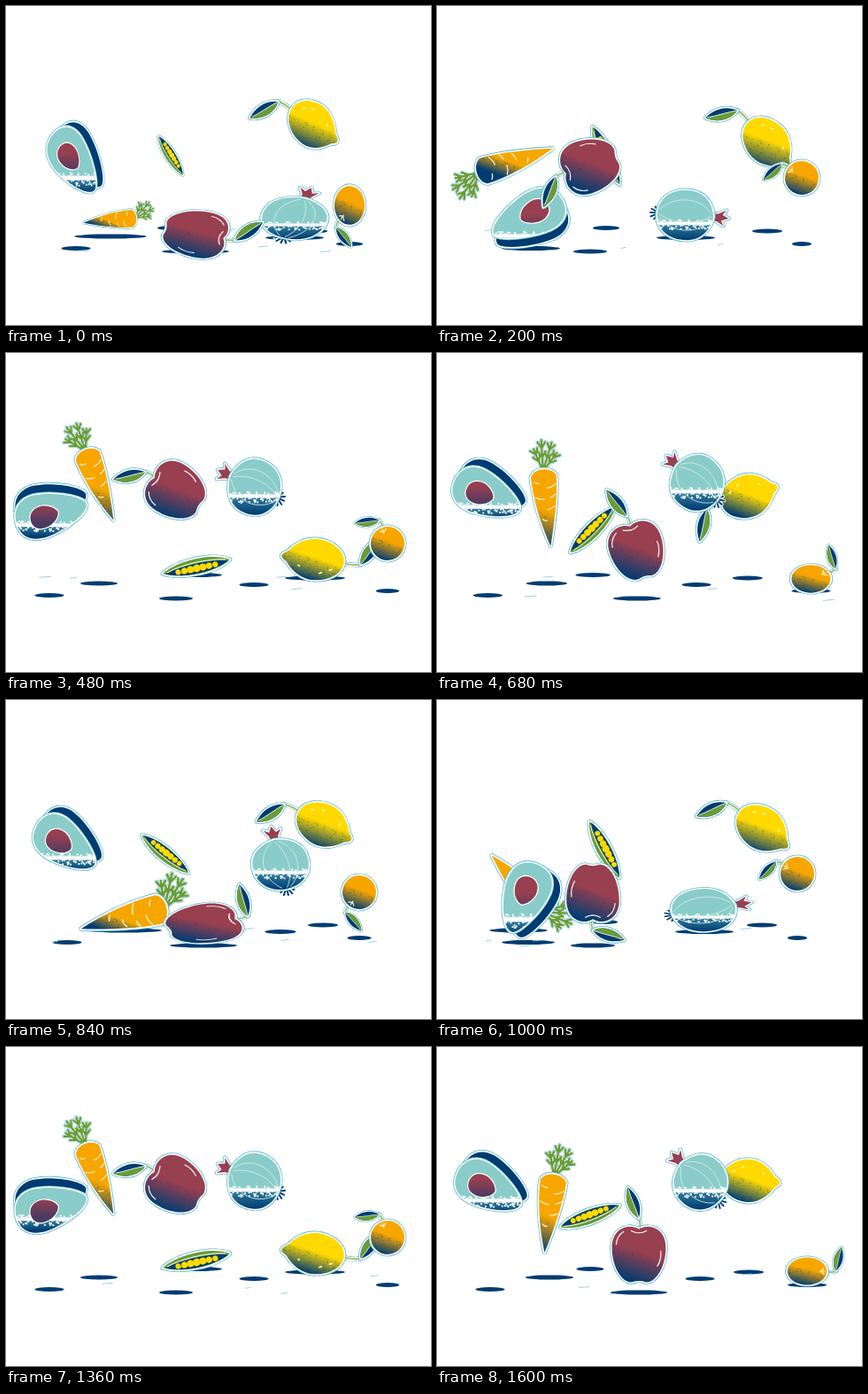
An HTML page with a canvas for the animation above (1640 ms loop, 480 by 360 pixels).

```html
<!DOCTYPE html>
<html lang="en">
<head>
<meta charset="utf-8">
<title>Bouncing fruit</title>
<style>
  html, body { margin: 0; width: 100%; height: 100%; overflow: hidden; background: #fff; }
  canvas { display: block; }
</style>
</head>
<body>
<canvas id="stage" width="480" height="360"></canvas>
<script>
const ctx = document.getElementById('stage').getContext('2d');
const LOOP = 1640, CYCLE = 880, STEP = 40, START = 400, SIZE = 0.95, TILT = 0.35;
const NAVY = '#003c71', CYAN = '#52b5d0', TEAL = '#8accc9', GREEN = '#6b9b37',
      YELLOW = '#ffd900', ORANGE = '#f7a600', MAROON = '#983f50', WHITE = '#fff';

// Key poses of one bounce cycle; every piece makes one full turn per cycle.
const TIMES = [0, 240, 360, 400, 520, 600];

const noise = n => { const s = Math.sin(n * 127.1 + 3.7) * 43758.5453; return s - Math.floor(s); };
const clamp = v => Math.max(0, Math.min(1, v));
const radians = degrees => degrees * Math.PI / 180;

// Cubic interpolation through cyclic keys; arcs may overshoot, other channels may not.
function sample(values, phase, turn = 0, overshoot = false) {
  const n = TIMES.length;
  const time = i => TIMES[(i + n) % n] + CYCLE * Math.floor(i / n);
  const value = i => values[(i + n) % n] + turn * Math.floor(i / n);
  const slope = i => (value(i + 1) - value(i)) / (time(i + 1) - time(i));
  const tangent = i => {
    const a = slope(i - 1), b = slope(i);
    if (!overshoot && a * b <= 0) return 0;
    const before = time(i) - time(i - 1), after = time(i + 1) - time(i);
    return (a * after + b * before) / (before + after);
  };
  let i = n - 1;
  while (TIMES[i] > phase) i--;
  const h = time(i + 1) - time(i), u = (phase - time(i)) / h, v = 1 - u;
  return value(i) * v * v * (1 + 2 * u) + value(i + 1) * u * u * (3 - 2 * u)
    + h * u * v * (tangent(i) * v - tangent(i + 1) * u);
}

function outlined(path, fill) {
  ctx.lineJoin = 'round';
  ctx.setLineDash([3, 1]);
  ctx.strokeStyle = CYAN;
  ctx.lineWidth = 5;
  ctx.stroke(path);
  ctx.setLineDash([]);
  line(path, WHITE, 3.4);
  ctx.fillStyle = fill;
  ctx.fill(path);
}

function line(path, color, width) {
  ctx.lineCap = 'round';
  ctx.strokeStyle = color;
  ctx.lineWidth = width;
  ctx.stroke(typeof path === 'string' ? new Path2D(path) : path);
}

// Shading along a fixed stage direction, whatever the turn of the piece.
function shade(angle, h, stops) {
  const dx = Math.sin(angle) * h, dy = Math.cos(angle) * h;
  const g = ctx.createLinearGradient(-dx, -dy, dx, dy);
  stops.forEach(([at, color]) => g.addColorStop(at, color));
  return g;
}

function grain(path, angle, h, color, from, to, count, size) {
  ctx.save();
  ctx.clip(path);
  ctx.rotate(-angle);
  ctx.fillStyle = color;
  for (let i = 0; i < count; i++) {
    const at = from + (to - from) * noise(i + 500);
    ctx.fillRect((noise(i) - 0.5) * 100, (at * 2 - 1) * h, size, size);
  }
  ctx.restore();
}

function body(path, pose, color, from = 0.45) {
  const angle = pose.angle - TILT;
  outlined(path, shade(angle, pose.h, [[from, color], [1, NAVY]]));
  grain(path, angle, pose.h, 'rgba(0,60,113,.5)', from + 0.05, 1, 140, 1);
}

function tealBody(path, pose, at) {
  outlined(path, shade(pose.angle, pose.h, [[at, TEAL], [at + 0.03, WHITE], [at + 0.07, WHITE],
    [at + 0.09, '#2c7899'], [1, NAVY]]));
  grain(path, pose.angle, pose.h, WHITE, at - 0.04, at + 0.15, 130, 2);
}

// The leaf keeps its own size while the body is squashed.
function stemAndLeaf(base, top, length, pose) {
  const stem = `M0 ${-base} Q3 ${-(base + top) / 2} 0 ${-top}`;
  line(stem, CYAN, 5.5);
  line(stem, WHITE, 4.5);
  line(stem, '#a8b860', 2);
  ctx.save();
  ctx.translate(0, -top);
  ctx.rotate(-pose.angle);
  ctx.scale(1 / pose.kx, 1 / pose.ky);
  ctx.rotate(pose.angle + radians(pose.bend));
  ctx.scale(length / 40, length / 40);
  outlined(new Path2D('M0 0C-10-11-9-27 0-39C8-27 9-12 0 0'), NAVY);
  ctx.fillStyle = GREEN;
  ctx.fill(new Path2D('M0 0C-10-11-9-27 0-39C-1-26 1-12 0 0'));
  line('M0 0C1-12-1-26 0-36', WHITE, 0.8);
  ctx.restore();
}

const egg = 'M-42 5C-42-13-30-23-13-22C10-20 42-4 44 5C45 17 12 29-12 30C-30 30-42 22-42 5Z';

function drawAvocado(pose) {
  const rind = new Path2D();
  rind.addPath(new Path2D(egg), new DOMMatrix().translate(3, -11));
  outlined(rind, NAVY);
  tealBody(new Path2D(egg), pose, 0.74);
  const seed = new Path2D('M-25 7C-25-3-17-8-7-7C3-5 9 2 9 6C6 15-4 19-12 19C-20 19-25 14-25 7Z');
  line(seed, WHITE, 2.5);
  ctx.fillStyle = shade(pose.angle, 16, [[0.3, MAROON], [1, '#4a3a62']]);
  ctx.fill(seed);
}

function drawCarrot(pose) {
  const sprigs = new Path2D();
  for (const a of [-0.5, -0.15, 0.2, 0.55]) {
    const len = 40 - Math.abs(a) * 24, tilt = a + radians(pose.bend);
    const c = Math.cos(tilt), s = Math.sin(tilt);
    sprigs.moveTo(-42, 0);
    sprigs.lineTo(-42 - c * len, -s * len);
    for (const k of [0.45, 0.75]) for (const side of [-0.6, 0.6]) {
      sprigs.moveTo(-42 - c * len * k, -s * len * k);
      sprigs.lineTo(-42 - c * len * k - Math.cos(tilt + side) * 8, -s * len * k - Math.sin(tilt + side) * 8);
    }
  }
  line(sprigs, CYAN, 4.2);
  line(sprigs, WHITE, 3.4);
  line(sprigs, GREEN, 2.4);
  const root = new Path2D('M-36-15C-10-14 20-7 46 0C20 9-10 15-36 15C-47 11-47-10-36-15Z');
  body(root, pose, ORANGE, 0.55);
  line('M-26-13Q-22-8-22-3M-12 12Q-9 7-9 2M0-9Q3-5 3-1M-30 12Q-28 9-28 6M14 6Q16 4 16 1M-14-12Q-11-9-11-6', '#fff1c8', 1.3);
}

function drawPea() {
  outlined(new Path2D('M-38 0C-22-11 18-11 38 0C20 11-20 12-38 0Z'), GREEN);
  ctx.fillStyle = NAVY;
  ctx.fill(new Path2D('M-36-1C-18-10 18-10 36-1C18 4-18 5-36-1Z'));
  line('M-33 1C-16 6 16 6 33 0', WHITE, 0.9);
  ctx.fillStyle = YELLOW;
  for (let i = -3; i <= 3; i++) {
    ctx.beginPath();
    ctx.arc(i * 7, -2, 4.3 - Math.abs(i) * 0.4, 0, 7);
    ctx.fill();
  }
}

function drawApple(pose) {
  stemAndLeaf(26, 43, 40, pose);
  body(new Path2D('M0-30C11-37 32-32 32-8C32 15 20 34 8 33Q0 30-8 33C-20 34-32 15-32-8C-32-32-11-37 0-30Z'), pose, MAROON);
  line('M-9-28Q0-23 9-28M-27-12Q-26-22-18-27M26-4Q27 6 22 14', WHITE, 1.2);
}

function drawOnion(pose) {
  const roots = 'M0 30L-5 39M0 30L0 40M0 30L5 39M0 30L-8 35M0 30L8 35';
  line(roots, WHITE, 4);
  line(roots, NAVY, 2);
  outlined(new Path2D('M-4-28L-5-36L-10-45L-4-41L0-48L4-40L10-43L5-35L4-28Z'), MAROON);
  tealBody(new Path2D('M0-31C10-30 32-24 32 0C32 20 18 32 0 32C-18 32-32 20-32 0C-32-24-10-30 0-31Z'), pose, 0.62);
  line('M-4-28C-25-15-24 15-5 30M4-28C25-15 24 15 5 30M0-28C12-10 12 15 1 30', '#d4eeec', 0.8);
}

function drawLemon(pose) {
  stemAndLeaf(30, 52, 40, pose);
  body(new Path2D('M0-33C15-33 25-16 25 0C25 16 13 27 6 32Q3 38 0 38Q-3 38-6 32C-13 27-25 16-25 0C-25-16-15-33 0-33Z'), pose, YELLOW);
  line('M10-20L11-18M15-9L16-7M9 18L10 17', '#fff3a0', 2);
}

function drawOrange(pose) {
  stemAndLeaf(17, 29, 30, pose);
  const ball = new Path2D();
  ball.arc(0, 0, 20, 0, 7);
  body(ball, pose, ORANGE, 0.42);
  line('M-4-17L0-14L4-17M0-18L0-13', '#fff1c8', 1.3);
}

// a, b: half size across and along; wide: shadow half width.
// p: how strongly a squash keeps the volume, -1 scales evenly.
const pieces = [
  { draw: drawPea, a: 37, b: 9, ground: 250.5, wide: 29, p: -1,
    x: [215, 173, 180, 186, 189, 191], y: [241, 191, 174, 169, 169, 169],
    turn: [-192, -20, 39, 58, 62, 65], squash: [1.07, 0.99, 0.94, 0.72, 1, 1] },
  { draw: drawLemon, a: 25, b: 34, ground: 254, wide: 34, p: 0.5, bend: -60,
    x: [349, 352, 358, 346, 367, 373], y: [233, 151, 141, 134, 145, 154],
    turn: [-263, -87, -62, -60, -54, -43], squash: [1.05, 0.97, 1, 0.9, 1, 1] },
  { draw: drawCarrot, a: 46, b: 16, ground: 260, wide: 42, p: -1,
    x: [105, 127, 134, 118, 92, 87], y: [148, 187, 246, 242, 209, 175],
    turn: [68, 97, 166, 175, 228, 342], squash: [1, 1.04, 1.16, 0.7, 1.04, 1.05],
    bend: [-8, 12, -55, -35, -38, -27] },
  { draw: drawOnion, a: 32, b: 32, ground: 261.5, wide: 33, p: 1.3,
    x: [280, 297, 310, 326, 302, 281], y: [151, 152, 185, 239, 237, 236],
    turn: [-66, -45, -13, 20, 76, 95], squash: [0.98, 0.99, 1.04, 1.2, 1.2, 1.06] },
  { draw: drawOrange, a: 20, b: 20, ground: 268.5, wide: 22, p: 1.3, bend: -76,
    x: [431, 418, 399, 388, 407, 412], y: [215, 253, 217, 225, 196, 194],
    turn: [-20, 90, 215, 218, 300, 305], squash: [1, 1.17, 1, 0.9, 1, 1] },
  { draw: drawAvocado, a: 45, b: 30, ground: 273.5, wide: 33, p: 0.3,
    x: [49, 60, 69, 79, 103, 106], y: [177, 155, 159, 172, 224, 241],
    turn: [-17, 25, 31, 46, 108, 148], squash: [1, 0.97, 0.94, 0.84, 1.03, 1.08] },
  { draw: drawApple, a: 32, b: 33, ground: 277, wide: 38, p: 1.3,
    x: [192, 228, 223, 214, 176, 173], y: [156, 234, 253, 257, 218, 180],
    turn: [-58, 0, 72, 102, 180, 252], squash: [1, 1, 1.29, 1.12, 0.98, 1],
    bend: [-45, -20, -87, -45, -73, -50] }
];

function poseOf(piece, phase) {
  const angle = radians(sample(piece.turn, phase, 360));
  const squash = sample(piece.squash, phase);
  return {
    angle,
    x: sample(piece.x, phase),
    y: sample(piece.y, phase, 0, true),
    kx: squash,
    ky: squash ** -piece.p,
    bend: Array.isArray(piece.bend) ? sample(piece.bend, phase) : piece.bend,
    h: Math.hypot(piece.a * Math.sin(angle), piece.b * Math.cos(angle))
  };
}

function drawShadow(piece, pose) {
  const near = clamp(1 - (piece.ground - pose.y - pose.h) / 60) ** 2;
  ctx.fillStyle = NAVY;
  ctx.beginPath();
  ctx.ellipse(pose.x, piece.ground, piece.wide * (0.5 + near / 2), 2.6, 0, 0, 7);
  ctx.fill();
}

function drawDust(tick) {
  ctx.setLineDash([2, 1]);
  for (let i = 0; i < 4; i++) {
    const x = 30 + 410 * noise(tick * 7 + i), y = 252 + 30 * noise(tick * 11 + i + 90);
    line(`M${x} ${y}l${5 + 8 * noise(i + tick)} -1`, '#8fd0df', 1);
  }
  ctx.setLineDash([]);
}

function render(now) {
  const tick = Math.floor((now % LOOP) / STEP);
  const phase = (tick * STEP + START) % CYCLE;
  ctx.fillStyle = WHITE;
  ctx.fillRect(0, 0, 480, 360);
  const poses = pieces.map(piece => poseOf(piece, phase));
  pieces.forEach((piece, i) => drawShadow(piece, poses[i]));
  drawDust(tick);
  pieces.forEach((piece, i) => {
    const pose = poses[i];
    ctx.save();
    ctx.translate(pose.x, pose.y);
    ctx.scale(pose.kx * SIZE, pose.ky * SIZE);
    ctx.rotate(pose.angle);
    piece.draw(pose);
    ctx.restore();
  });
}

const begin = performance.now();
function loop() {
  render(performance.now() - begin);
  requestAnimationFrame(loop);
}
loop();
</script>
</body>
</html>
```
